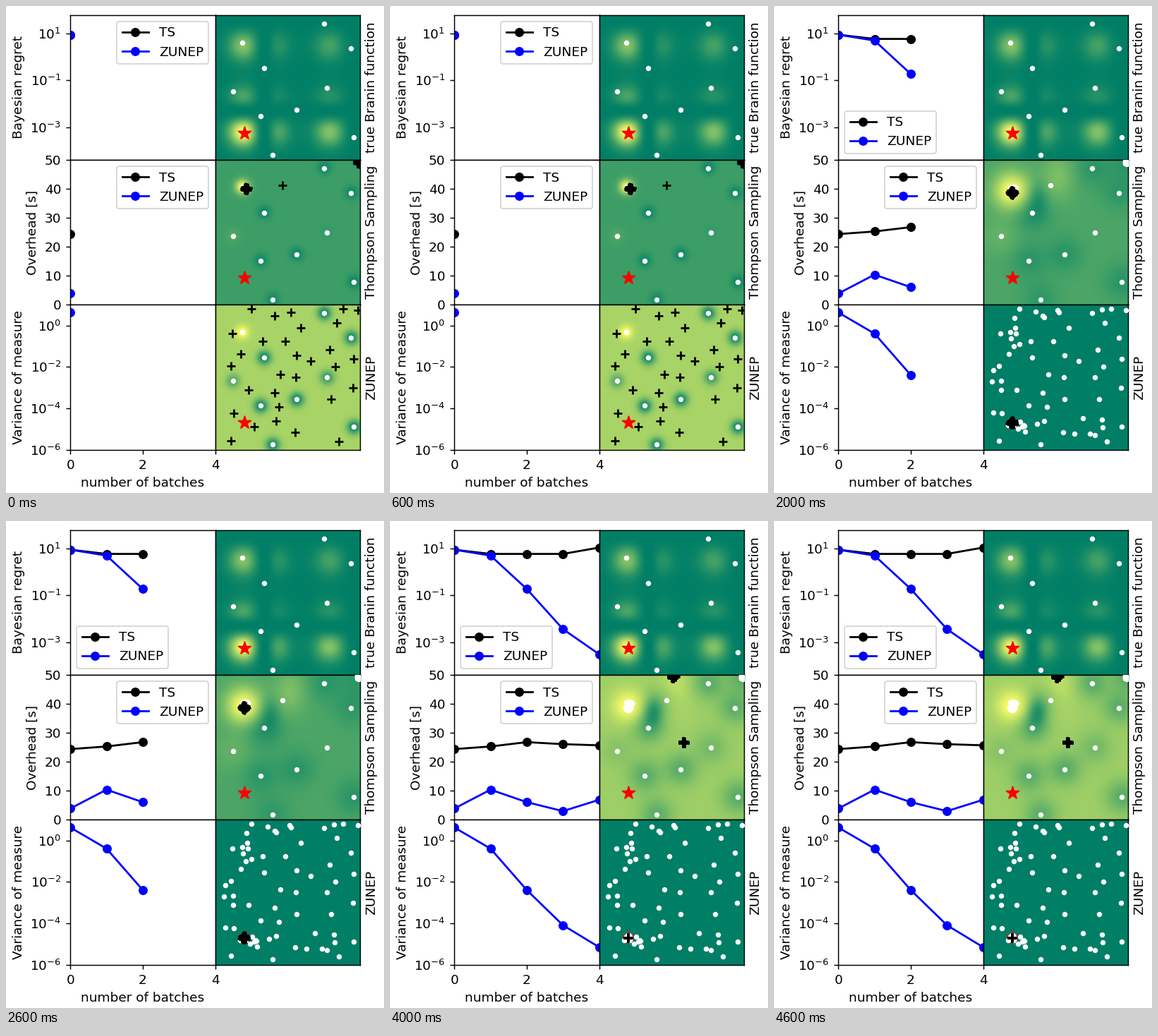
A matplotlib script for the animation above (5 s loop, 536 px wide and 690 px high).

```python
import matplotlib.pyplot as plt
import numpy as np
from matplotlib.animation import FuncAnimation
from matplotlib.ticker import NullLocator

W, H, DPI = 536, 690, 400 / 3
LEFT, TOP, SIDE = 91.2, 12.7, 616 / 3
METHOD = "ZUNEP"
rng = np.random.default_rng(4)

plt.rcParams["font.family"] = "DejaVu Sans"
fig = plt.figure(figsize=((W + 1e-6) / DPI, (H + 1e-6) / DPI), dpi=DPI,
                 facecolor="white")


def add_panel(col, row):
    x, y = LEFT + col * SIDE, TOP + row * SIDE
    return fig.add_axes([x / W, 1 - (y + SIDE) / H, SIDE / W, SIDE / H])


# ---- line charts ----------------------------------------------------------
def powers(*exponents):
    return 10.0 ** np.array(exponents)


charts = [
    ("Bayesian regret", powers(-4.39, 1.78), powers(-3, -1, 1),
     [("TS", "k", powers(0.94, 0.76, 0.76, 0.76, 1.03)),
      (METHOD, "b", powers(0.94, 0.69, -0.73, -2.44, -3.51))]),
    ("Overhead [s]", (0, 50), np.arange(0, 51, 10),
     [("TS", "k", [24.4, 25.3, 26.8, 26.1, 25.7]),
      (METHOD, "b", [3.9, 10.4, 6.1, 3.0, 6.9])]),
    ("Variance of measure", powers(-6, 1), powers(-6, -4, -2, 0),
     [(METHOD, "b", powers(0.63, -0.39, -2.39, -4.09, -5.15))]),
]

chart_axes, curves = [], []
for row, (label, ylim, ticks, series) in enumerate(charts):
    ax = add_panel(0, row)
    if row != 1:
        ax.set_yscale("log")
    ax.set_yticks(ticks)
    ax.yaxis.set_minor_locator(NullLocator())
    ax.set_xticks([0, 2, 4] if row == 2 else [])
    ax.set_xlim(0, 4)
    ax.set_ylim(*ylim)
    ax.set_ylabel(label)
    for name, color, values in series:
        line, = ax.plot([], [], color=color, marker="o", label=name)
        curves.append((line, values))
    chart_axes.append(ax)
chart_axes[1].legend(loc="upper right")
chart_axes[2].set_xlabel("number of batches")

# ---- sample points, in pixels from a panel's top left corner --------------
start = np.array([(154, 12), (192, 47), (38, 39), (69, 75), (25, 108),
                  (158, 103), (115, 134), (64, 143), (196, 173), (81, 198)])
best = (41, 167)


def cluster(center, radius, count=40):
    angle = rng.uniform(0, 2 * np.pi, count)
    r = radius * np.sqrt(rng.uniform(0, 1, count))
    return np.column_stack([r * np.cos(angle), r * np.sin(angle)]) + center


def spread(count, taken, hole, radius):
    """Well spaced random points that keep clear of a round hole."""
    points = list(taken)
    for _ in range(count):
        options = rng.uniform((22, 4), (203, 203), (15, 2))
        options = options[np.hypot(*(options - hole).T) > radius]
        gaps = [np.hypot(*(np.array(points) - p).T).min() for p in options]
        points.append(options[np.argmax(gaps)])
    return np.array(points[len(taken):])


def explore():
    """Second batch: groups of (x, y, spread x, spread y, count)."""
    groups = [(56, 170, 12, 5, 10), (41, 48, 8, 16, 6), (147, 168, 17, 12, 6),
              (14, 130, 8, 35, 4), (105, 8, 38, 6, 4)]
    points = [rng.normal((x, y), (sx, sy), (n, 2))
              for x, y, sx, sy, n in groups]
    return np.clip(np.vstack(points), 3, SIDE - 3)


peak, lone, corner = (41, 46.5), (95, 35.5), (204, 3)
ts_batches = [
    np.vstack([cluster((44, 40.5), 2.6), [lone], cluster(corner, 3)]),
    cluster(peak, 3.2), cluster(peak, 3.4), cluster(peak, 3.2),
    np.vstack([cluster((105, 2), 3.4), cluster((120, 95.5), 2)]),
]

hot = [(24, 41), (55, 173)]
wide = np.vstack([hot, spread(28, [*start, *hot], (147, 167), 36)])
new_batches = [wide, explore(), cluster(best, 3.4),
               cluster(best, 0.8), cluster(best, 0.8)]

# ---- colour fields --------------------------------------------------------
RES = 206
axis = (np.arange(RES) + 0.5) * SIDE / RES
X, Y = np.meshgrid(axis, axis)
cells = np.column_stack([X.ravel(), Y.ravel()])


def score(points):
    """Separable test function on the square from -2 to 3."""
    x, y = points.T * 5 / SIDE

    def g(t):
        wave = np.abs(np.sin(t) + 0.5 * np.cos(3 * t))
        return wave ** 2.4 / (t * t / 2 + 0.3) ** 0.72
    return g(x - 2) * g(3 - y)


def kernel(a, b, length):
    d2 = ((a[:, None] - b[None]) ** 2).sum(axis=2)
    return np.exp(-d2 / (2 * length ** 2))


def surface(points, base, length, low=0.0):
    """Gaussian process mean through the scores, resting at base."""
    values = score(points)
    values = low + (1 - low) * values / values.max()
    gram = kernel(points, points, length) + 0.02 * np.eye(len(points))
    weights = np.linalg.solve(gram, values - base)
    return base + (kernel(cells, points, length) @ weights).reshape(X.shape)


def ripple(depth):
    """A dip right of the peak with a bright streak beside it."""
    dip = np.exp(-((X - 76) / 10) ** 2 / 2 - ((Y - 52) / 15) ** 2 / 2)
    streak = np.exp(-((X - 107) / 16) ** 2 / 2 - ((Y - 22) / 24) ** 2 / 2)
    return 0.16 * streak - depth * dip


truth = score(cells).reshape(X.shape)
truth /= truth.max()
known = np.vstack([start, [peak, lone, corner]])
flat = np.zeros_like(X)
settled = surface(known, 0.3, 18, 0.16) + ripple(0.18)

ts_fields = [surface(start, 0.24, 7, 0.04),
             surface(known, 0.28, 16, 0.12) + ripple(0.1),
             settled, settled,
             surface(known, 0.62, 16, 0.34) + ripple(0.4)]
new_fields = [surface(start, 0.66, 7),
              surface(np.vstack([start, wide]), 0.5, 13), flat, flat, flat]

# ---- maps -----------------------------------------------------------------
none = np.empty((0, 2))
maps = [("true Branin function", [truth] * 5, [none] * 5),
        ("Thompson Sampling", ts_fields, ts_batches),
        (METHOD, new_fields, new_batches)]

views = []
for row, (label, fields, batches) in enumerate(maps):
    ax = add_panel(1, row)
    image = ax.imshow(fields[0], cmap="summer", vmin=0, vmax=1, aspect="auto",
                      extent=(0, SIDE, SIDE, 0))
    ax.scatter(*best, s=100, marker="*", color="red", zorder=2)
    seen = ax.scatter([], [], marker=".", s=36, color="white", zorder=3)
    batch = ax.scatter([], [], marker="+", s=36, color="black", zorder=4)
    ax.set_xticks([])
    ax.set_yticks([])
    ax.set_xlim(0, SIDE)
    ax.set_ylim(SIDE, 0)
    ax.yaxis.set_label_position("right")
    ax.set_ylabel(label)
    views.append((image, seen, batch, fields, batches))


def update(k):
    for line, values in curves:
        line.set_data(np.arange(k + 1), values[:k + 1])
    chart_axes[0].legend(loc="upper right" if k < 2 else "lower left")
    for image, seen, batch, fields, batches in views:
        image.set_data(fields[k])
        seen.set_offsets(np.vstack([start, *batches[:k]]))
        batch.set_offsets(batches[k])
    return []


anim = FuncAnimation(fig, update, frames=5, interval=1000, repeat=True,
                     repeat_delay=0)
plt.show()
```
